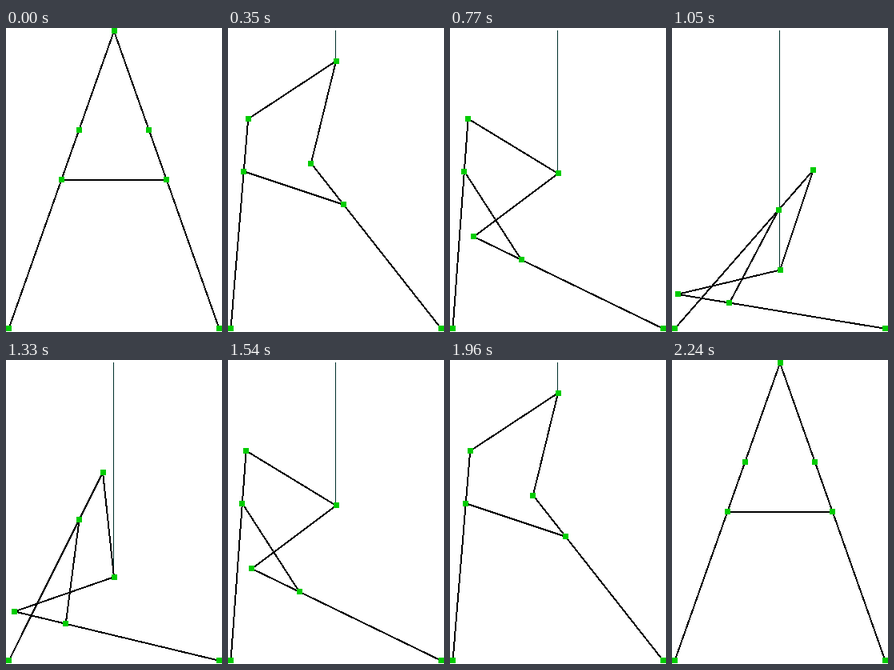
An HTML page for the animation above (2590 ms loop, 270 by 380 pixels).

```html
<!DOCTYPE html>
<html lang="en">
<head>
<meta charset="utf-8">
<title>Straight-line linkage</title>
<style>
  html, body { margin: 0; width: 100%; height: 100%; overflow: hidden; background: #fff; }
  svg { display: block; width: 270px; height: 380px; }
  path { fill: none; shape-rendering: crispEdges; }
  #bars { stroke: #000; stroke-width: 2; }
  #trace { stroke: #00302b; stroke-width: 1; }
  rect { fill: #00cc00; shape-rendering: crispEdges; }
</style>
</head>
<body>
<svg viewBox="0 0 270 380">
  <path id="trace"/>
  <path id="bars"/>
  <g id="joints"></g>
</svg>
<script>
const LOOP = 2590, STEP = 70, LAST = 15;
const UNIT = 131.5, CENTER = 135, GROUND = 375.8, MARK = 7;
const START_ANGLE = Math.acos(1 / 3);

const trace = document.getElementById('trace');
const bars = document.getElementById('bars');
const joints = document.getElementById('joints');
const marks = Array.from({ length: 7 }, () => {
  const mark = document.createElementNS('http://www.w3.org/2000/svg', 'rect');
  mark.setAttribute('width', MARK);
  mark.setAttribute('height', MARK);
  return joints.appendChild(mark);
});

// Step number: hold up, fold down, hold down, rise again.
function stepAt(ms) {
  const down = Math.floor((ms - 70) / STEP);
  const up = LAST - 1 - Math.floor((ms - 1260) / STEP);
  return ms < 1260 ? Math.min(LAST, Math.max(0, down)) : Math.max(0, up);
}

// The right leg turns a little slower as it sinks.
function crankAngle(n) {
  const turned = n * (4.6825 + (n - 4) * (-0.03655 + (n - 10) * 0.001223));
  return START_ANGLE - turned * Math.PI / 180;
}

// Unit coordinates: feet at (-1, 0) and (1, 0), y upwards.
function solve(angle) {
  const right = r => [1 - r * Math.cos(angle), r * Math.sin(angle)];
  const [kx, ky] = right(1.5);
  const reach = Math.hypot(kx + 1, ky);
  const bend = Math.acos((reach * reach + 1.25) / (3 * reach));
  const leftAngle = Math.atan2(ky, kx + 1) + bend;
  const left = r => [r * Math.cos(leftAngle) - 1, r * Math.sin(leftAngle)];
  const [ex, ey] = right(2);
  const apex = [0, ey + Math.sqrt(1 - ex * ex)];
  return [left(0), left(1.5), left(2), apex, right(2), right(1.5), right(0)];
}

const toStage = ([x, y]) => [CENTER + UNIT * x, GROUND - UNIT * y];

function draw(ms) {
  const points = solve(crankAngle(stepAt(ms))).map(toStage);
  const [footL, kneeL, elbowL, apex, elbowR, kneeR, footR] = points;
  bars.setAttribute('d',
    `M${footL}L${elbowL}L${apex}L${elbowR}L${footR}M${kneeL}L${kneeR}`);
  trace.setAttribute('d', `M134.5 3V${apex[1]}`);
  points.forEach(([x, y], i) => {
    marks[i].setAttribute('x', Math.round(x - MARK / 2));
    marks[i].setAttribute('y', Math.round(y - MARK / 2));
  });
}

let begin;
function tick(now) {
  begin ??= now;
  draw((now - begin) % LOOP);
  requestAnimationFrame(tick);
}
draw(0);
requestAnimationFrame(tick);
</script>
</body>
</html>
```
